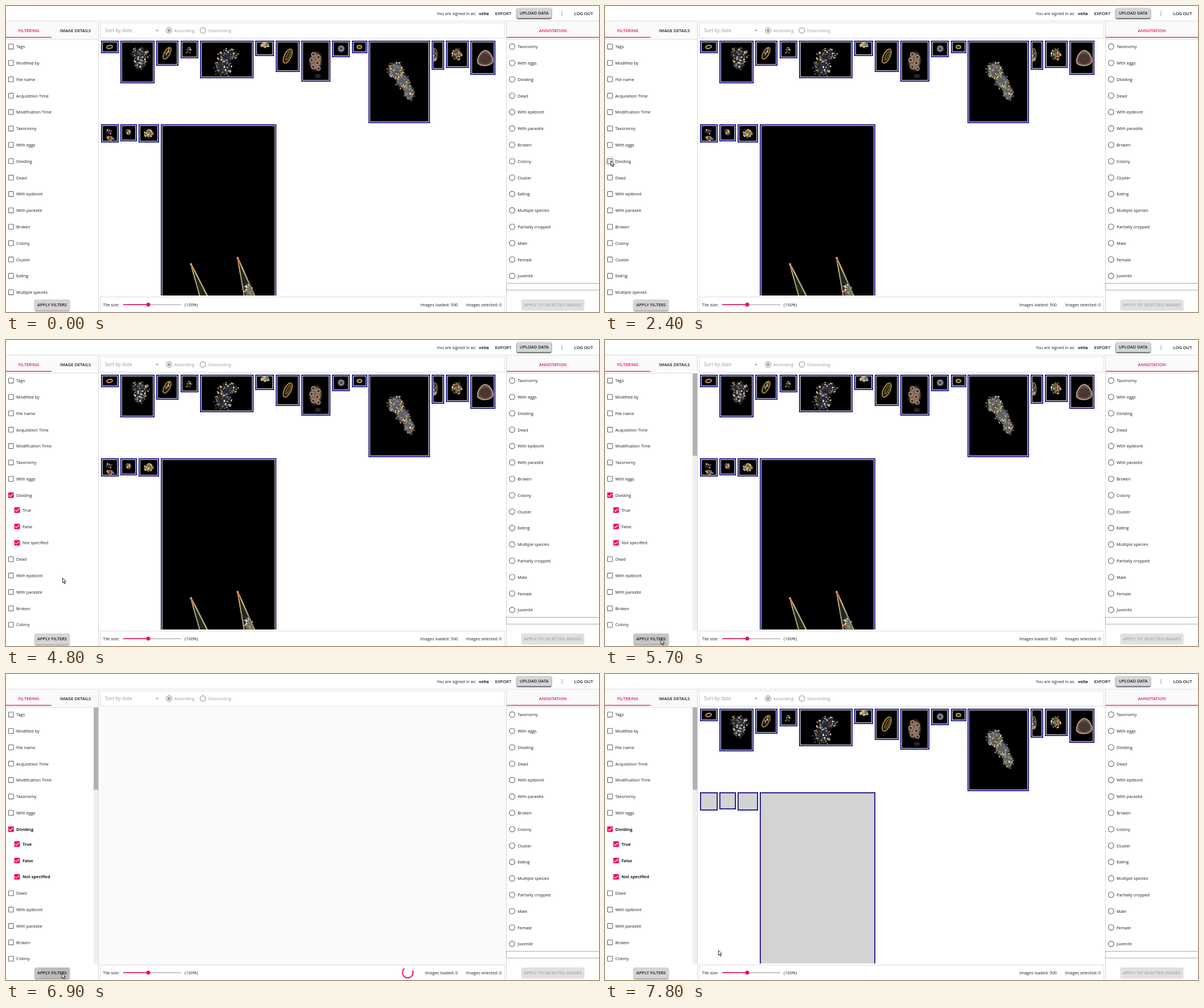
Recreate the animation shown at these times as an HTML page with a canvas. Size 1042 by 538 pixels, loop 8 s.

```html
<!DOCTYPE html>
<html lang="en">
<head>
<meta charset="utf-8">
<title>Image annotation</title>
<style>
html, body { margin: 0; width: 100%; height: 100%; overflow: hidden; background: #fff; }
canvas { display: block; width: 1042px; height: 538px; }
</style>
</head>
<body>
<canvas id="stage" width="1042" height="538"></canvas>
<script>
const W = 1042, H = 538, LOOP = 8000;
const PINK = '#f01059', INK = '#1c1c1c', NAVY = '#000080', MUTED = '#999';
const ROW = 28.8, FIRST = 71.5;
const stage = document.getElementById('stage').getContext('2d');
let c = stage;

const FILTERS = ['Tags', 'Modified by', 'File name', 'Acquisition Time', 'Modification Time',
  'Taxonomy', 'With eggs', 'Dividing', 'Dead', 'With epibiont', 'With parasite', 'Broken',
  'Colony', 'Cluster', 'Eating', 'Multiple species'];
const LABELS = ['Taxonomy', 'With eggs', 'Dividing', 'Dead', 'With epibiont', 'With parasite',
  'Broken', 'Colony', 'Cluster', 'Eating', 'Multiple species', 'Partially cropped', 'Male',
  'Female', 'Juvenile'];
const OPTIONS = ['True', 'False', 'Not specified'];

// ---- drawing helpers ----
function rect(x, y, w, h, color) {
  c.fillStyle = color;
  c.fillRect(x, y, w, h);
}
function frame(x, y, w, h, color, width = 1) {
  c.strokeStyle = color;
  c.lineWidth = width;
  c.strokeRect(x + width / 2, y + width / 2, w - width, h - width);
}
function disc(x, y, r, color) {
  c.fillStyle = color;
  c.beginPath();
  c.arc(x, y, r, 0, 7);
  c.fill();
}
function line(points, color, width) {
  c.strokeStyle = color;
  c.lineWidth = width;
  c.beginPath();
  points.forEach(([x, y]) => c.lineTo(x, y));
  c.stroke();
}
function text(str, x, y, { size = 7.4, weight = 500, color = INK, align = 'left' } = {}) {
  c.font = `${weight} ${size}px "Open Sans", "Noto Sans", sans-serif`;
  c.fillStyle = color;
  c.textAlign = align;
  c.textBaseline = 'alphabetic';
  c.fillText(str, x, y + size * 0.36);
}
function clipTo(x, y, w, h, draw) {
  c.save();
  c.beginPath();
  c.rect(x, y, w, h);
  c.clip();
  draw();
  c.restore();
}
function button(x, y, w, h, label, fill, { color = INK, shade = 0 } = {}) {
  c.save();
  if (shade) {
    c.shadowColor = `rgba(0,0,0,${shade})`;
    c.shadowBlur = 2;
    c.shadowOffsetY = 1.3;
  }
  c.fillStyle = fill;
  c.beginPath();
  c.roundRect(x, y, w, h, 2);
  c.fill();
  c.restore();
  text(label, x + w / 2, y + h / 2, { size: 7.5, weight: 600, color, align: 'center' });
}
function checkbox(x, y, on) {
  const half = on ? 4.9 : 4.35;
  c.beginPath();
  c.roundRect(x - half, y - half, half * 2, half * 2, 1);
  if (on) {
    c.fillStyle = PINK;
    c.fill();
    line([[x - 3.2, y + .1], [x - 1.1, y + 2.2], [x + 3.4, y - 2.3]], '#fff', 1.1);
  } else {
    c.strokeStyle = '#666';
    c.lineWidth = 1.1;
    c.stroke();
  }
}
function radio(x, y, color, on) {
  c.strokeStyle = color;
  c.lineWidth = 1.1;
  c.beginPath();
  c.arc(x, y, 4.9, 0, 7);
  c.stroke();
  if (on) disc(x, y, 2.6, color);
}

// ---- specimens ----
let seed = 7;
function rnd() {
  seed = (seed * 16807) % 2147483647;
  return seed / 2147483647;
}
const SPECKS = ['#e8d9a0', '#e0ad60', '#b8683f', '#8d93a0', '#fff0c8', '#a89a58', '#5a6480'];

function placed(x, y, turn, draw) {
  c.save();
  c.translate(x, y);
  c.rotate(turn);
  draw();
  c.restore();
}
function glow(x, y, rx, ry, turn, inner) {
  placed(x, y, turn, () => {
    c.scale(rx, ry);
    const g = c.createRadialGradient(0, 0, 0, 0, 0, 1);
    g.addColorStop(0, inner);
    g.addColorStop(.6, inner);
    g.addColorStop(1, 'rgba(0,0,0,0)');
    disc(0, 0, 1, g);
  });
}
function cloud(x, y, rx, ry, turn, count, base = 'rgba(65,70,90,.6)', size = 1) {
  glow(x, y, rx * 1.1, ry * 1.1, turn, base);
  placed(x, y, turn, () => {
    for (let i = 0; i < count; i++) {
      const a = rnd() * 6.283, r = Math.sqrt(rnd());
      disc(Math.cos(a) * r * rx, Math.sin(a) * r * ry, (.5 + rnd()) * size,
        SPECKS[Math.floor(rnd() * SPECKS.length)]);
    }
  });
}
function ring(x, y, rx, ry, turn, color, fill = 'rgba(90,65,35,.4)') {
  placed(x, y, turn, () => {
    c.beginPath();
    c.ellipse(0, 0, rx, ry, 0, 0, 7);
    c.fillStyle = fill;
    c.fill();
    c.strokeStyle = color;
    c.lineWidth = 1.5;
    c.stroke();
  });
}
function spine(x, y, leftX, rightX) {
  const g = c.createLinearGradient(0, y, 0, 512);
  g.addColorStop(0, '#d0652e');
  g.addColorStop(.25, '#d8b878');
  g.addColorStop(.6, '#9aa888');
  g.addColorStop(1, '#d6b860');
  c.beginPath();
  [[x, y], [leftX, 512], [rightX, 512]].forEach(p => c.lineTo(...p));
  c.fillStyle = 'rgba(75,72,60,.5)';
  c.fill();
  line([[x, y + 2], [leftX, 512]], g, 1.9);
  line([[x, y], [rightX, 512]], g, 2.4);
  disc(x, y + 1, 2, '#d69a74');
}

const PALE = 'rgba(125,128,130,.75)';
const TOP_TILES = [
  [167, 31, 22, () => ring(182, 72, 5, 2.8, -.25, '#e5ad7c')],
  [201, 60, 75, () => { cloud(235, 85, 18, 12, .1, 45); cloud(235, 101, 12, 13, 0, 45); }],
  [264, 39, 44, () => { ring(283, 83, 5, 11.5, .5, '#b59a4e'); cloud(283, 82, 2, 8, .5, 10); }],
  [307, 31, 31, () => cloud(322, 78, 7, 5, -.3, 17, 'rgba(60,65,60,.4)', .8)],
  [341, 94, 66, () => { cloud(390, 87, 20, 13, -.2, 50); cloud(382, 108, 17, 18, .2, 60); }],
  [438, 33, 27, () => cloud(455, 68, 8, 6, .2, 35, 'rgba(145,165,130,.8)')],
  [474, 42, 55, () => { ring(495, 88, 6, 13.5, .45, '#c2a640'); ring(496, 87, 2.5, 9, .45, '#6d6033'); }],
  [519, 51, 72, () => {
    glow(544, 97, 14, 21, .1, '#806456');
    [[540, 85], [549, 90], [537, 95], [547, 100], [540, 107], [549, 110]]
      .forEach(([x, y]) => ring(x, y, 3.2, 3.2, 0, '#b89a84', '#4a3830'));
    glow(548, 123, 7, 5, 0, 'rgba(80,85,100,.45)');
  }],
  [573, 31, 29, () => { glow(589, 75, 8, 8, 0, '#74727d'); ring(589, 75, 3.5, 3.5, 0, '#9b9498', '#4c4854'); }],
  [608, 27, 22, () => ring(621, 72, 4, 2.8, 0, '#e0c468', '#3a2c16')],
  [637, 108, 145, () => {
    cloud(684, 113, 15, 16, .2, 75, PALE);
    cloud(697, 132, 13, 18, -.5, 75, PALE);
    cloud(708, 152, 10, 15, -.2, 50, PALE);
  }],
  [748, 22, 51, () => { ring(753, 86, 4.5, 11, 0, '#ad8b56'); cloud(753, 86, 4, 11, 0, 25); }],
  [773, 40, 48, () => cloud(793, 85, 9, 11, 0, 60, 'rgba(105,95,80,.6)')],
  [816, 44, 60, () => {
    c.beginPath();
    c.moveTo(842, 78);
    c.bezierCurveTo(852, 80, 857, 93, 855, 99);
    c.bezierCurveTo(849, 107, 834, 106, 829, 100);
    c.bezierCurveTo(827, 93, 833, 80, 842, 78);
    c.fillStyle = '#65504a';
    c.fill();
    c.strokeStyle = '#bf9a80';
    c.lineWidth = 2;
    c.stroke();
    glow(842, 93, 11, 10, 0, 'rgba(62,46,42,.75)');
  }],
];
const LOWER_TILES = [
  [167, 31, 32, () => { cloud(183, 232, 7, 5, 0, 25); cloud(181, 221, 6, 4, 0, 8); }],
  [201, 29, 30, () => { glow(215, 222, 6, 7, -.5, '#946039'); cloud(215, 222, 4, 5, -.5, 15); }],
  [233, 36, 32, () => cloud(251, 224, 8, 8, 0, 45, 'rgba(150,138,85,.8)')],
  [272, 203, 320, () => {
    spine(325, 453, 341, 355);
    spine(407, 442, 419, 438);
    cloud(427, 504, 8, 20, -.2, 45, 'rgba(120,130,125,.7)');
  }],
];

const BORDER = 1.65, INSET = 2.75;
function tileRow(tiles, y, loaded) {
  for (const [x, w, h, specimen] of tiles) {
    rect(x + .5, y + .5, w - 1, h - 1, loaded ? '#fff' : '#d3d3d3');
    frame(x, y, w, h, NAVY, BORDER);
    if (!loaded) continue;
    const hole = [x + INSET, y + INSET, w - INSET * 2, h - INSET * 2];
    rect(...hole, '#000');
    clipTo(...hole, () => {
      c.filter = 'blur(0.45px)';
      specimen();
    });
  }
}
function renderGallery(lowerLoaded) {
  const layer = document.createElement('canvas');
  layer.width = W;
  layer.height = H;
  c = layer.getContext('2d');
  seed = 7;
  clipTo(163, 58, 716, 451, () => {
    tileRow(TOP_TILES, 61, true);
    tileRow(LOWER_TILES, 208, lowerLoaded);
  });
  c = stage;
  return layer;
}
const fullGallery = renderGallery(true), partialGallery = renderGallery(false);

// ---- panels ----
const caps = (str, x, y, color = INK, align = 'left') =>
  text(str, x, y, { size: 7.5, weight: 600, color, align });

function header() {
  rect(0, 26, W, 1, '#ddd');
  text('You are signed in as:', 757, 13.5, { size: 7.25 });
  text('velia', 831, 13.5, { size: 7.3, weight: 700 });
  caps('EXPORT', 859.5, 13.5);
  button(897.5, 3.5, 61, 18, 'UPLOAD DATA', '#d5d5d5', { shade: .9 });
  [10.6, 13.4, 16.2].forEach(y => disc(977, y, .75, '#555'));
  caps('LOG OUT', 998.5, 13.5);
}

function filterPanel(t) {
  const open = t >= 3800, applied = t >= 6600, hover = t >= 5300 && t < 7800;
  rect(0, 27, 162, 31, '#fafafa');
  rect(0, 58, 162, 1, '#ddd');
  rect(162, 27, 1, 511, '#d5d5d5');
  caps('FILTERING', 40, 43, PINK, 'center');
  caps('IMAGE DETAILS', 122, 43, INK, 'center');
  rect(0, 54.5, 80, 1.3, PINK);

  clipTo(0, 59, 162, 452, () => {
    if (t >= 2300 && t < 3800) disc(9, 273, 10.5, 'rgba(0,0,0,.07)');
    if (open && t < 4300) disc(9, 273, 10.5, 'rgba(233,30,99,.16)');
    if (t >= 4300 && t < 4500) disc(9, 273, 8, 'rgba(233,30,99,.08)');
    if (t >= 4500 && t < 5000) disc(19.5, 357, 10.5, 'rgba(233,30,99,.05)');
    FILTERS.forEach((name, i) => {
      const y = FIRST + ROW * i + (open && i > 7 ? 83.7 : 0);
      const on = open && i === 7;
      checkbox(8.8, y - .2, on);
      text(name, 18, y, { weight: on && applied ? 700 : 500 });
    });
    if (open) OPTIONS.forEach((name, i) => {
      const y = 299.2 + ROW * i;
      checkbox(19.5, y - .2, true);
      text(name, 29, y, { weight: applied ? 700 : 500 });
    });
    if (t >= 5300) {
      rect(154, 59, 8, 452, '#f0f0f0');
      rect(154, 58, 8, 145.5, '#b1b1b1');
    }
  });

  button(50.5, 516, 61, 19.5, 'APPLY FILTERS', hover ? '#c5c5c5' : '#d5d5d5', { shade: .5 });
  if (applied && t < 7300) {
    clipTo(50.5, 516, 61, 19.5, () => disc(98, 526, t < 6900 ? 24 : 37, 'rgba(0,0,0,.05)'));
  }
}

function annotationPanel() {
  rect(879, 27, 163, 31, '#fafafa');
  rect(879, 58, 163, 1, '#ddd');
  rect(879, 27, 1, 511, '#d5d5d5');
  caps('ANNOTATION', 961, 43, PINK, 'center');
  rect(880, 54.5, 162, 1.3, PINK);
  LABELS.forEach((name, i) => {
    const y = FIRST + ROW * i;
    radio(889.3, y - .2, '#666', false);
    text(name, 899, y);
  });
  frame(879, 487, 164, 13, '#aaa');
  button(905.5, 516, 111, 19.5, 'APPLY TO SELECTED IMAGES', '#e0e0e0', { color: '#a6a6a6' });
}

function spinner(t) {
  const [from, to] = t < 6900 ? [-5, 205] : t < 7300 ? [-25, 230] : [-45, 250];
  c.strokeStyle = PINK;
  c.lineWidth = 2;
  c.beginPath();
  c.arc(706, 525, 9.3, from * Math.PI / 180, to * Math.PI / 180);
  c.stroke();
}

function workspace(t) {
  const loading = t >= 6600 && t < 7800;
  if (loading) rect(163, 58, 716, 453, '#fafafa');
  else c.drawImage(t < 6600 ? fullGallery : partialGallery, 0, 0);

  frame(165, 29, 712, 28, '#ddd');
  text('Sort by date', 174, 43, { size: 8.5, weight: 400, color: MUTED });
  c.fillStyle = MUTED;
  c.beginPath();
  c.moveTo(263, 42);
  c.lineTo(268.2, 42);
  c.lineTo(265.6, 44.7);
  c.fill();
  radio(286.5, 43, MUTED, true);
  text('Ascending', 295.8, 43, { color: MUTED });
  radio(346, 43, MUTED, false);
  text('Descending', 355.5, 43, { color: MUTED });

  rect(165, 511, 712, 27, '#fff');
  frame(165, 511, 712, 30, '#ddd');
  text('Tile size:', 170.5, 525.5);
  rect(206, 524.7, 102, 1, '#a08a92');
  rect(206, 524.3, 44, 1.6, PINK);
  disc(250, 525, 3.5, PINK);
  text('(100%)', 314, 525.5);
  text(`Images loaded: ${loading ? 0 : 500}`, 794, 525.5, { size: 7.3, align: 'right' });
  text('Images selected: 0', 871, 525.5, { size: 7.3, align: 'right' });
  if (loading) spinner(t);
}

// ---- pointer ----
const STOPS = [[4000, 19, 281], [4300, 67, 348], [4500, 72, 363], [4800, 99, 418],
  [5000, 111, 506], [5300, 104, 526], [5500, 99, 525.5], [5700, 98, 526],
  [7300, 127, 514], [7800, 199, 485.5]];

function pointerAt(t) {
  if (t < 1100) return null;
  const step = Math.floor(t / 100);
  if (t < 2000) {
    const u = (step - 11) / 8, v = 1 - u;
    return [9 * v * v + 244 * u * v + 42 * u * u, 200 * u * v + 205 * u * u];
  }
  if (t < 4000) {
    const left = (1 - Math.min(1, (step - 19) / 5)) ** 1.5;
    return [10 + 32 * left, 272 - 67 * left];
  }
  return STOPS.filter(s => s[0] <= t).pop().slice(1);
}
function pointer(t) {
  const at = pointerAt(t);
  if (!at) return;
  placed(at[0], at[1], 0, () => {
    c.beginPath();
    [[.3, .3], [.3, 9], [2.3, 7.2], [3.7, 10.6], [5.2, 10], [3.8, 6.7], [6.5, 6.5]]
      .forEach(([x, y]) => c.lineTo(x, y));
    c.closePath();
    c.fillStyle = '#fff';
    c.fill();
    c.strokeStyle = '#111';
    c.lineWidth = .9;
    c.stroke();
  });
}

function tick(now) {
  const t = now % LOOP;
  rect(0, 0, W, H, '#fff');
  header();
  workspace(t);
  filterPanel(t);
  annotationPanel();
  pointer(t);
  requestAnimationFrame(tick);
}
requestAnimationFrame(tick);
</script>
</body>
</html>
```
